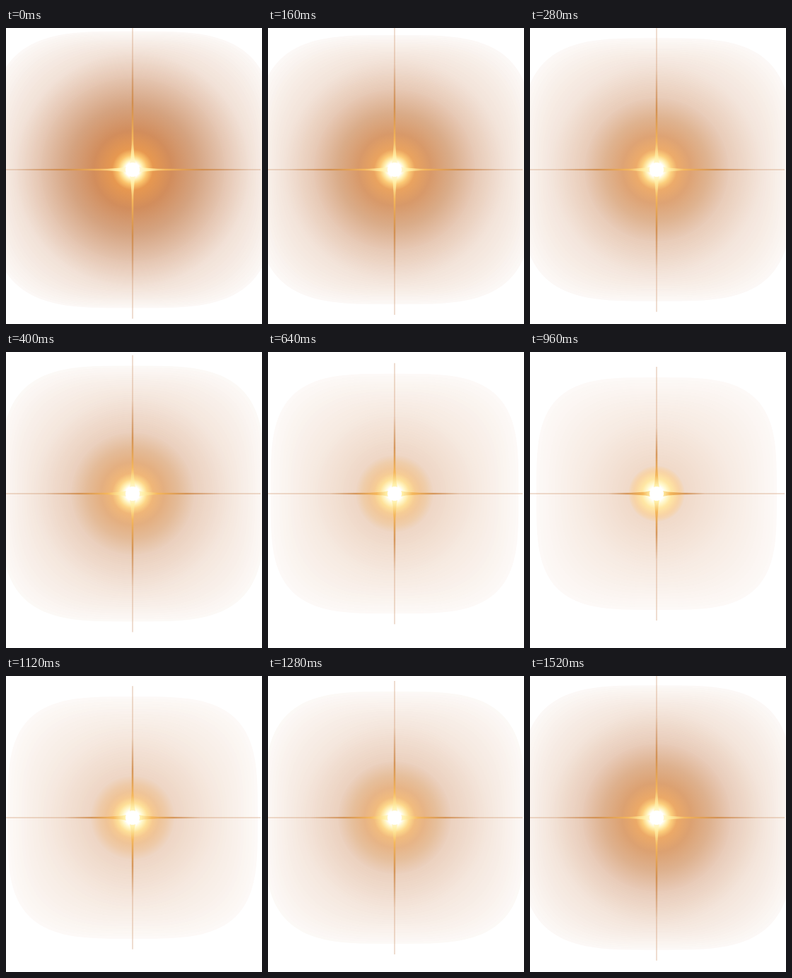
An HTML page with a canvas that plays this animation: 362x420 px, repeating every 1680 ms.

```html
<!DOCTYPE html>
<html lang="en">
<head>
<meta charset="utf-8">
<title>Pulsing star</title>
<style>
  html, body { margin: 0; width: 362px; height: 420px; overflow: hidden; background: #fff; }
  canvas { display: block; }
</style>
</head>
<body>
<canvas id="stage" width="362" height="420"></canvas>
<script>
const ctx = document.getElementById('stage').getContext('2d');
const LOOP = 1680, LAST_STEP = 1520, STEP = 40, RINGS = 32;
const CX = 179, CY = 201, WHITE = [255, 255, 255];

// Radius of the warm glow over time: [ms, px]
const PULSE = [[0, 130], [280, 102], [400, 87], [640, 55], [860, 38], [960, 40], [1280, 80], [1520, 105]];
const slope = (a, b) => (b[1] - a[1]) / (b[0] - a[0]);
const mix = (a, b, k) => a + (b - a) * k;
const blend = (a, b, k) => a.map((v, i) => mix(v, b[i], k));
const css = (color, alpha = 1) => `rgba(${color.join(',')},${alpha})`;

function glowRadius(t) {
  let i = 0;
  while (i < PULSE.length - 2 && t > PULSE[i + 1][0]) i++;
  const a = PULSE[i], b = PULSE[i + 1], span = b[0] - a[0];
  const before = PULSE[i - 1] || a, after = PULSE[i + 2] || b;
  const inSlope = before === a ? slope(a, b) : slope(before, b);
  const outSlope = after === b ? slope(a, b) : slope(a, after);
  const u = (t - a[0]) / span, v = 1 - u;
  return a[1] * (1 + 2 * u) * v * v + b[1] * u * u * (3 - 2 * u)
    + span * u * v * (inSlope * v - outSlope * u);
}

// Superellipse: power 2 is a circle, higher powers are squarer.
function blob(radius, power, color) {
  const bend = v => Math.sign(v) * Math.abs(v) ** (2 / power) * radius;
  ctx.beginPath();
  for (let i = 0; i < 120; i++) {
    const a = i * Math.PI / 60;
    ctx.lineTo(CX + bend(Math.cos(a)) * (1 + (power - 2) * 0.02), CY + bend(Math.sin(a)));
  }
  ctx.fillStyle = color;
  ctx.fill();
}

function radial(radius, stops) {
  const g = ctx.createRadialGradient(CX, CY, 0, CX, CY, radius);
  for (const [r, color] of stops) g.addColorStop(r / radius, css(color));
  ctx.fillStyle = g;
  ctx.beginPath();
  ctx.arc(CX, CY, radius, 0, 2 * Math.PI);
  ctx.fill();
}

function ray(angle, length, reach) {
  ctx.save();
  ctx.translate(CX, CY);
  ctx.rotate(angle);
  ctx.fillStyle = 'rgba(190,120,70,.25)';
  ctx.fillRect(length, -1, reach - length, 2);
  const g = ctx.createLinearGradient(0, 0, length, 0);
  g.addColorStop(0, '#fff');
  g.addColorStop(0.12, '#fff0a8');
  g.addColorStop(0.28, '#f5b75c');
  g.addColorStop(0.6, 'rgba(208,136,66,.8)');
  g.addColorStop(1, 'rgba(195,125,70,.25)');
  ctx.fillStyle = g;
  const side = [[0, 6], [16, 2.6], [36, 1.3], [length, 1.1]];
  ctx.beginPath();
  for (const [x, y] of side) ctx.lineTo(x, y);
  for (const [x, y] of side.reverse()) ctx.lineTo(x, -y);
  ctx.fill();
  ctx.restore();
}

function draw(t) {
  const glow = glowRadius(t), outer = 151 + 0.35 * glow;
  const k = Math.max(0, (glow - 38) / 92), spread = k ** 0.75;
  const tint = blend([205, 130, 75], [185, 100, 45], k);
  const rim = mix(0.3, 0.38, k);
  ctx.fillStyle = '#fff';
  ctx.fillRect(0, 0, 362, 420);

  for (let i = 0; i < RINGS; i++) {
    const s = i / RINGS;
    const power = 2 + 1.5 * Math.max(0, 1 - s / 0.45);
    blob(mix(outer, glow, s), power, css(blend(WHITE, tint, mix(0.045, rim, s))));
  }

  radial(glow, [
    [0, WHITE],
    [10, WHITE],
    [15, blend([255, 248, 205], [255, 238, 170], k)],
    [21, blend([255, 232, 165], [251, 196, 108], k)],
    [29, blend([250, 216, 165], [231, 152, 80], k)],
    [mix(30, glow, 0.25), blend([248, 213, 170], [210, 141, 92], k)],
    [mix(30, glow, 0.6), blend([245, 214, 180], [213, 163, 128], k)],
    [glow, blend(WHITE, tint, rim)],
  ]);

  const across = 63 + 102 * spread, along = 90 + 67 * spread;
  for (let i = 0; i < 4; i++) {
    ray(i * Math.PI / 2, i % 2 ? along : across, i % 2 ? outer + 15 : 181);
  }
  blob(10, 2, '#fff');
}

function tick() {
  const t = Math.min(performance.now() % LOOP, LAST_STEP);
  draw(Math.floor(t / STEP) * STEP);
  requestAnimationFrame(tick);
}
tick();
</script>
</body>
</html>
```
